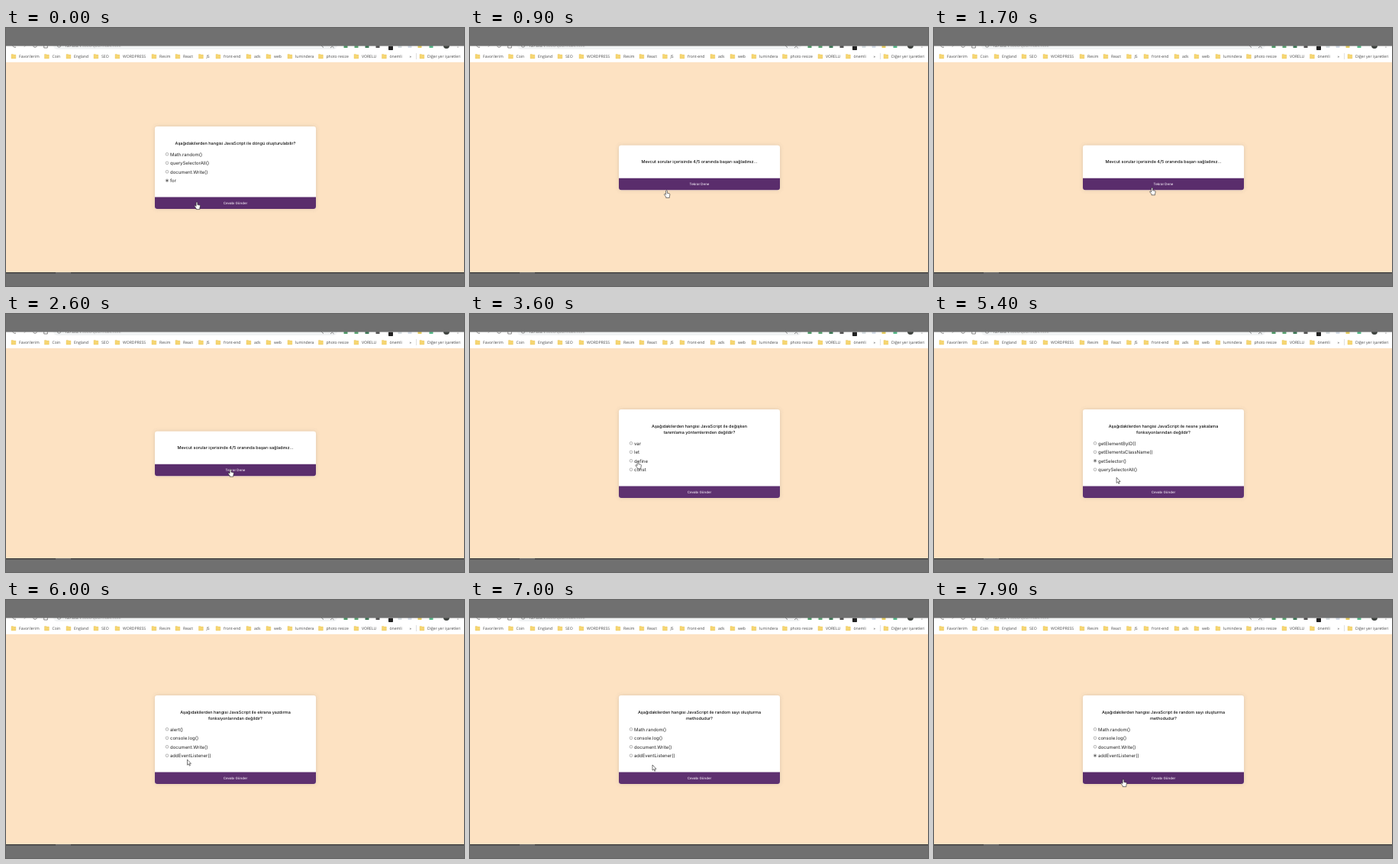
These frames come from a looping animation (600x338 px, 8 s). An HTML page:

```html
<!DOCTYPE html>
<html lang="tr">
<head>
<meta charset="utf-8">
<title>Quiz</title>
<style>
html, body { margin: 0; width: 100%; height: 100%; overflow: hidden; background: #fde2c2; }
svg { display: block; width: 100vw; height: 100vh; }
text { text-rendering: geometricPrecision; }
.bar { font: 5.1px "Open Sans", sans-serif; fill: #484848; }
.title { font: 500 5.5px Inter, sans-serif; fill: #111; text-anchor: middle; }
.option { font: 6px Inter, sans-serif; fill: #222; }
.button { font: 500 4.45px Inter, sans-serif; fill: #f4ecf6; text-anchor: middle; }
</style>
</head>
<body>
<svg id="stage" viewBox="0 0 600 338" preserveAspectRatio="none">
  <defs>
    <filter id="shadow" x="-10%" y="-20%" width="120%" height="140%">
      <feDropShadow dx="0" dy="0" stdDeviation="2.4" flood-color="#646464" flood-opacity=".22"/>
    </filter>
  </defs>
  <rect width="600" height="338" fill="#fde2c2"/>
  <rect y="23" width="600" height="21.8" fill="#fff"/>
  <g id="toolbar"></g>
  <g id="bookmarks"></g>
  <rect width="600" height="23.6" fill="#707070"/>
  <rect y="320" width="600" height="18" fill="#707070"/>
  <rect y="320" width="600" height="1.4" fill="#3c3c3c"/>
  <rect x="65" y="320.4" width="20" height="1" fill="#858585"/>
  <g id="cards"></g>
  <g id="cursor" stroke-width=".6" stroke-linejoin="round" fill="#fff" stroke="#222">
    <path id="arrow" d="M0 0V7.2L1.7 5.7 2.8 8.2 3.9 7.7 2.8 5.3H5Z"/>
    <path id="hand" d="M-.9 .8A.9 .9 0 0 1 .9 .8V3.6L3.6 4.1Q4.6 4.4 4.4 5.6L3.8 8V9.6H-.8V8.4L-3 5.6Q-3.2 4.4 -2 4.6L-.9 5.5Z"/>
  </g>
</svg>
<script>
const LOOP = 8000;
const PURPLE = '#5e3170', PURPLE_HOVER = '#5a2d6c';
const $ = id => document.getElementById(id);

function add(parent, tag, attrs, text) {
  const el = document.createElementNS('http://www.w3.org/2000/svg', tag);
  for (const key in attrs) el.setAttribute(key, attrs[key]);
  if (text) el.textContent = text;
  parent.appendChild(el);
  return el;
}
const show = (el, on) => el.setAttribute('display', on ? 'inline' : 'none');

// Browser chrome
function buildToolbar() {
  const bar = $('toolbar');
  const line = (d, color = '#666') => add(bar, 'path', { d, fill: 'none', stroke: color, 'stroke-width': .8 });
  add(bar, 'rect', { x: 62, y: 18, width: 372, height: 10, rx: 5, fill: '#f1f3f4' });
  line('M8 22.5L10.5 25.2L13 25.2');
  line('M26 22.5L23.5 25.2', '#aaa');
  line('M35.5 23.5A2.7 2.7 0 0 0 40.6 23.5');
  line('M49.7 22V26H54.3V22');
  add(bar, 'circle', { cx: 69.5, cy: 23, r: 2.2, fill: 'none', stroke: '#666', 'stroke-width': .7 });
  const url = add(bar, 'text', { x: 77, y: 24.9, class: 'bar' }, '127.0.0.1');
  add(url, 'tspan', { fill: '#999' }, ':5500/quiz/index.html');
  line('M413 23L416 25.6');
  line('M425 26L427.3 24L429.6 26');
  const icons = [[445, '#4f9a68'], [459, '#5aa573'], [473, '#3f7a58'], [487, '#555'], [516, '#d5dce0'],
    [529, '#d3dbe6'], [542, '#e5cc5e'], [557, '#55b988']];
  for (const [x, fill] of icons) add(bar, 'rect', { x: x - 2.5, y: 21, width: 5, height: 5, fill });
  add(bar, 'rect', { x: 501, y: 23.4, width: 6, height: 5.6, rx: .7, fill: '#222' });
  add(bar, 'circle', { cx: 577, cy: 23, r: 4, fill: '#3f4440' });
  add(bar, 'circle', { cx: 592, cy: 25, r: .6, fill: '#555' });
}

function buildBookmarks() {
  const bar = $('bookmarks');
  const items = [[17, 'Favorilerim'], [60.5, 'Coin'], [89, 'England'], [125, 'SEO'], [153, 'WORDPRESS'],
    [201, 'Resim'], [232, 'React'], [262.5, 'JS'], [285, 'front-end'], [325, 'ads'], [351, 'web'],
    [379, 'lumindera'], [419.5, 'photo resize'], [466, 'VORELU'], [502.5, 'önemli'], [552, 'Diğer yer işaretleri']];
  for (const [x, label] of items) {
    add(bar, 'path', { d: `M${x - 10} 34.4H${x - 7.6}L${x - 7} 35.1H${x - 4.2}V40H${x - 10}Z`, fill: '#f6d672', stroke: '#e8c04f', 'stroke-width': .4 });
    add(bar, 'text', { x, y: 38.9, class: 'bar' }, label);
  }
  add(bar, 'text', { x: 528.5, y: 38.6, class: 'bar' }, '»');
  add(bar, 'path', { d: 'M537.5 33V41', stroke: '#ccc', 'stroke-width': .6 });
}

// Cards: each is shown from its start until the next one; pick is [option, time]
const ASK = 'Aşağıdakilerden hangisi JavaScript ile ';
const SEND = 'Cevabı Gönder';
const scenes = [
  { from: 0, top: 129, bottom: 237, title: [ASK + 'döngü oluşturulabilir?'],
    options: ['Math.random()', 'querySelectorAll()', 'document.Write()', 'for'], pick: [3, 0], button: SEND },
  { from: 350, top: 153.8, bottom: 212.2, title: ['Mevcut sorular içerisinde 4/5 oranında başarı sağladınız...'],
    options: [], button: 'Tekrar Dene' },
  { from: 2700 },
  { from: 2850, title: [ASK + 'değişken', 'tanımlama yöntemlerinden değildir?'],
    options: ['var', 'let', 'define', 'const'], pick: [2, 3900], button: SEND },
  { from: 4400, title: [ASK + 'nesne yakalama', 'fonksiyonlarından değildir?'],
    options: ['getElementByID()', 'getElementsClassName()', 'getSelector()', 'querySelectorAll()'], pick: [2, 5200], button: SEND },
  { from: 5700, title: [ASK + 'ekrana yazdırma', 'fonksiyonlarından değildir?'],
    options: ['alert()', 'console.log()', 'document.Write()', 'addEventListener()'], pick: [3, 6250], button: SEND },
  { from: 6700, title: [ASK + 'random sayı oluşturma', 'methodudur?'],
    options: ['Math.random()', 'console.log()', 'document.Write()', 'addEventListener()'], pick: [3, 7450], button: SEND }
];

function buildCard(scene) {
  const g = scene.g = add($('cards'), 'g', {});
  if (!scene.title) return;
  const { top = 125, bottom = 241, title, options } = scene;
  const split = bottom - 15.4;
  scene.split = split;
  scene.bottom = bottom;
  add(g, 'rect', { x: 195, y: top, width: 211, height: bottom - top, rx: 3.2, fill: '#fff', filter: 'url(#shadow)' });
  scene.bar = add(g, 'path', { d: `M195 ${split}H406V${bottom - 3.2}a3.2 3.2 0 0 1 -3.2 3.2H198.2a3.2 3.2 0 0 1 -3.2 -3.2Z` });
  title.forEach((line, i) => add(g, 'text', { x: 300.5, y: top + 23.5 + i * 8, class: 'title' }, line));
  const first = top + 28.5 + title.length * 8;
  scene.rows = options.map((label, i) => {
    const y = first + i * 11.5;
    add(g, 'circle', { cx: 211, cy: y - .2, r: 1.9, fill: '#f4f4f4', stroke: '#8a8a8a', 'stroke-width': .55 });
    add(g, 'text', { x: 215, y: y + 2.1, class: 'option' }, label);
    return { y, right: 215 + label.length * 3.1 };
  });
  if (scene.pick) scene.dot = add(g, 'circle', { cx: 211, cy: scene.rows[scene.pick[0]].y - .2, r: 1.15, fill: '#555' });
  add(g, 'text', { x: 300.5, y: split + 9.2, class: 'button' }, scene.button);
}

// Pointer path: time, x, y of the hot spot
const path = [
  [0, 250, 228], [400, 250, 228], [850, 257.5, 212.8], [1000, 257.5, 212.8], [1300, 266, 220], [1800, 288, 208],
  [2400, 294, 203.5], [2850, 294, 203.5], [3400, 223, 195], [3700, 219, 192.5], [3900, 219, 192.5],
  [4250, 252.5, 235], [4750, 252.5, 235], [5100, 228, 193], [5250, 228, 193], [5550, 250, 235],
  [5730, 250, 235], [6000, 237.5, 209], [6200, 232, 204], [6300, 232, 204], [6560, 249, 235],
  [6750, 249, 235], [7000, 239, 216], [7300, 230, 205], [7500, 230, 205], [7800, 248, 235], [8000, 248, 235]
];

function pointer(t) {
  let i = 1;
  while (i < path.length - 1 && path[i][0] <= t) i++;
  const [t0, x0, y0] = path[i - 1], [t1, x1, y1] = path[i];
  const k = Math.min(1, (t - t0) / (t1 - t0));
  const e = k * k * (3 - 2 * k);
  return [x0 + (x1 - x0) * e, y0 + (y1 - y0) * e];
}

function render(t) {
  const scene = scenes.filter(s => s.from <= t).pop();
  for (const s of scenes) show(s.g, s === scene);
  const [x, y] = pointer(t);
  let hand = false;
  if (scene.bar) {
    const hover = y >= scene.split && y <= scene.bottom + 1.2;
    scene.bar.setAttribute('fill', hover ? PURPLE_HOVER : PURPLE);
    hand = hover || scene.rows.some(r => x >= 215 && x <= r.right && Math.abs(y - r.y) < 3.5);
  }
  if (scene.dot) show(scene.dot, t >= scene.pick[1]);
  $('cursor').setAttribute('transform', `translate(${x.toFixed(2)} ${y.toFixed(2)})`);
  show($('hand'), hand);
  show($('arrow'), !hand);
}

function tick() {
  render(performance.now() % LOOP);
  requestAnimationFrame(tick);
}

buildToolbar();
buildBookmarks();
scenes.forEach(buildCard);
render(0);
requestAnimationFrame(tick);
</script>
</body>
</html>
```
